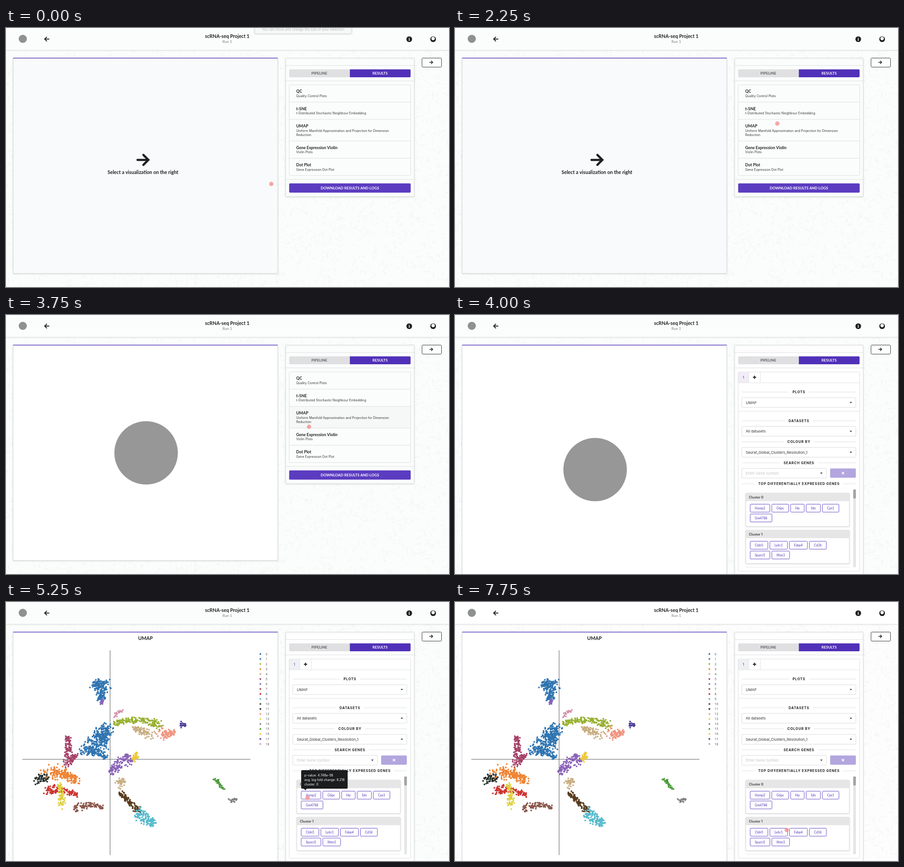
Write an HTML page with a canvas that moves like this. It is 977 px wide and 573 px high and loops after 8 s.

```html
<!DOCTYPE html>
<html lang="en">
<head>
<meta charset="utf-8">
<title>Visualization browser</title>
<style>
html, body { margin: 0; width: 100%; height: 100%; overflow: hidden; background: #fafdfb; }
canvas { display: block; width: 977px; height: 573px; }
</style>
</head>
<body>
<canvas id="stage" width="977" height="573"></canvas>
<script>
const ctx = document.getElementById('stage').getContext('2d');
const LOOP = 8000, STEP = 250;
const LATO = 'Lato, sans-serif', INTER = 'Inter, sans-serif';
const PURPLE = '#5030b8', INK = '#1f2021', RULE = '#dcdfde';
const TITLE = { font: LATO, weight: 700, align: 'center' };
const COLORS = ['#2f74b0', '#2f74b0', '#97b02f', '#ee8434', '#c9ae82', '#a54167', '#8a63b8',
  '#8a564b', '#cc3330', '#55b9cc', '#573a1c', '#24302a', '#f0937e', '#ddd040', '#808080',
  '#4a9b3a', '#efc83a', '#4f3f96', '#d38fac'];

// Key points of the pointer: time, x, y
const POINTER = [[0, 585, 345], [1250, 602, 213], [1750, 733, 197], [3000, 670, 238],
  [4000, 668, 249], [5250, 665, 433], [6000, 716, 435], [6750, 756, 435], [7500, 756, 435],
  [7750, 731.5, 504.5]];

const TIPS = [
  { gene: 'Hamp2', from: 5250, to: 5750, p: '4.748e-56', fold: 6.218 },
  { gene: 'G6pc', from: 6000, to: 6500, p: '2.153e-48', fold: 5.407 },
  { gene: 'Hp', from: 7000, to: 7750, p: '1.362e-41', fold: 5.126 }];

let seed = 1;
function random() {
  seed = (seed * 16807) % 2147483647;
  return seed / 2147483647;
}

function text(str, x, y, size, { font = INTER, weight = 400, color = INK, align = 'left', spacing = 0 } = {}) {
  ctx.font = `${weight} ${size}px ${font}`;
  ctx.letterSpacing = spacing + 'px';
  ctx.textAlign = align;
  ctx.fillStyle = color;
  ctx.fillText(str, x, y + size * 0.36);
  const width = ctx.measureText(str).width;
  ctx.letterSpacing = '0px';
  return width;
}

function box(x, y, w, h, { fill, stroke, radius = 2 } = {}) {
  ctx.beginPath();
  ctx.roundRect(x, y, w, h, radius);
  if (fill) { ctx.fillStyle = fill; ctx.fill(); }
  if (stroke) { ctx.strokeStyle = stroke; ctx.lineWidth = 1; ctx.stroke(); }
}

function path(points, color, width = 1) {
  ctx.beginPath();
  points.forEach(([x, y]) => ctx.lineTo(x, y));
  ctx.strokeStyle = color;
  ctx.lineWidth = width;
  ctx.stroke();
}

const rule = (x0, x1, y, color = RULE) => path([[x0, y], [x1, y]], color);

function disc(x, y, r, color) {
  ctx.beginPath();
  ctx.arc(x, y, r, 0, Math.PI * 2);
  ctx.fillStyle = color;
  ctx.fill();
}

function triangle(x, y, half, height, color) {
  ctx.beginPath();
  ctx.moveTo(x - half, y);
  ctx.lineTo(x + half, y);
  ctx.lineTo(x, y + height);
  ctx.fillStyle = color;
  ctx.fill();
}

// Arrow pointing right for dir = 1, left for dir = -1
function arrow(x, y, half, head, width, dir) {
  ctx.lineCap = 'round';
  path([[x - half * dir, y], [x + half * dir * 0.85, y]], INK, width);
  path([[x + (half - head) * dir, y - head], [x + half * dir, y], [x + (half - head) * dir, y + head]], INK, width);
  ctx.lineCap = 'butt';
}

function cross(x, y, size, color, width, turn) {
  for (let i = 0; i < 2; i++) {
    const a = turn + i * Math.PI / 2, dx = size * Math.cos(a), dy = size * Math.sin(a);
    path([[x - dx, y - dy], [x + dx, y + dy]], color, width);
  }
}

function shadowed(draw) {
  ctx.save();
  ctx.shadowColor = 'rgba(34,36,38,.13)';
  ctx.shadowBlur = 3;
  ctx.shadowOffsetY = 1;
  draw();
  ctx.restore();
}

function drawTexture() {
  seed = 77;
  ctx.beginPath();
  for (let i = 0; i < 3300; i++) {
    const x = random() * 977, y = 50 + random() * 523, a = random() * Math.PI, r = 3 + random() * 3;
    ctx.moveTo(x - r * Math.cos(a), y - r * Math.sin(a));
    ctx.lineTo(x + r * Math.cos(a), y + r * Math.sin(a));
  }
  ctx.strokeStyle = '#eff2f0';
  ctx.lineWidth = 0.9;
  ctx.stroke();
}

function drawPage(bright) {
  ctx.fillStyle = bright ? '#fdfdfd' : '#fafdfb';
  ctx.fillRect(0, 0, 977, 573);
  drawTexture();
  shadowed(() => {
    ctx.fillStyle = bright ? '#ffffff' : '#fbfdfc';
    ctx.fillRect(0, 0, 977, 49);
  });
  rule(0, 977, 49, '#e1e4e2');
  disc(37, 24, 9, '#8f9190');
  arrow(90, 24.5, 4.7, 4.4, 2, -1);
  text('scRNA-seq Project 1', 488, 18.5, 10.65, TITLE);
  text('Run 1', 488, 30, 8.15, { font: LATO, color: '#77797a', align: 'center' });

  disc(889.3, 24.7, 6.3, INK);
  text('i', 889.3, 24.7, 9.5, { font: '"Noto Serif", serif', weight: 700, color: '#fff', align: 'center' });

  disc(942, 24.7, 6.3, INK);
  disc(942, 23.2, 3.7, '#fff');

  box(917.5, 66.5, 43, 20, { fill: '#fff', stroke: '#343536' });
  arrow(937.7, 76, 3.3, 3, 1.5, 1);
}

function drawStagePanel(bottom, fill) {
  shadowed(() => box(15.5, 66.5, 584, bottom - 66.5, { fill, stroke: '#dadbe0' }));
  ctx.fillStyle = '#6143c4';
  ctx.fillRect(15.5, 65.8, 584, 1.5);
}

function drawSidePanel(bottom, fill) {
  shadowed(() => box(616.5, 66.5, 284, bottom - 66.5, { fill, stroke: RULE }));
  rule(616, 901, 83);
  rule(616, 901, 117);
  box(624.5, 91.5, 134, 17.5, { fill: '#e0e0e2', radius: [2, 0, 0, 2] });
  box(758.3, 91.5, 134, 17.5, { fill: PURPLE, radius: [0, 2, 2, 0] });
  text('PIPELINE', 691, 100.3, 8.2, { ...TITLE, color: '#5d5e60' });
  text('RESULTS', 825, 100.3, 8.2, { ...TITLE, color: '#fff' });
}

function drawList(hovered) {
  const items = [
    ['QC', 'Quality Control Plots'],
    ['t-SNE', 't-Distributed Stochastic Neighbour Embedding'],
    ['UMAP', 'Uniform Manifold Approximation and Projection for Dimension', 'Reduction'],
    ['Gene Expression Violin', 'Violin Plots'],
    ['Dot Plot', 'Gene Expression Dot Plot']];
  drawSidePanel(373, '#fbfdfc');
  let y = 125.8;
  for (const [title, ...lines] of items) {
    const height = 28.6 + lines.length * 9.6;
    if (title === hovered) box(625, y, 267, height, { fill: '#f6f7f7', radius: 0 });
    if (y > 126) rule(624.5, 892.5, y);
    text(title, 640, y + 14.3, 8.9, { font: LATO, weight: 700 });
    lines.forEach((line, i) => text(line, 640, y + 24.9 + i * 9.6, 7, { color: '#343638' }));
    y += height;
  }
  box(624.5, 125.8, 268, y - 125.8, { stroke: RULE });
  rule(616, 901, 335);
  box(624.5, 343.7, 268, 20.6, { fill: '#5b3cc0' });
  text('DOWNLOAD RESULTS AND LOGS', 758.3, 354.2, 8.2, { ...TITLE, color: '#fff' });
}

function heading(label, y) {
  const half = text(label, 758.6, y, 7.5, { weight: 700, align: 'center', spacing: 0.8 }) / 2 + 8;
  rule(632.5, 758.3 - half, y);
  rule(758.3 + half, 884, y);
}

function dropdown(label, y, right = 884, color = '#303234') {
  box(632.5, y - 10.8, right - 632.5, 21.6, { fill: '#fff', stroke: '#d9dadc' });
  text(label, 641.3, y, 8, { color });
  triangle(right - 11, y - 1.3, 2.6, 2.8, INK);
}

// Draws the chips and returns the left edge of each by gene
function drawChips(genes, top) {
  const lefts = {};
  let x = 651;
  for (const gene of genes) {
    ctx.font = `400 7.1px ${LATO}`;
    const w = ctx.measureText(gene).width + 20.6;
    box(x, top, w, 17.6, { fill: '#fff', stroke: '#6448c2' });
    text(gene, x + w / 2, top + 8.9, 7.1, { font: LATO, color: PURPLE, align: 'center' });
    lefts[gene] = x;
    x += w + 4.3;
  }
  return lefts;
}

function drawCard(title, y, ...rows) {
  shadowed(() => box(641, y, 229, 73.8, { fill: '#fff', stroke: '#dddee0' }));
  box(641, y, 229, 17.8, { fill: '#e6e6e7', radius: [2, 2, 0, 0] });
  text(title, 648.3, y + 9.2, 7.1, { weight: 700, color: '#48494b' });
  return Object.assign({}, ...rows.map((genes, i) => drawChips(genes, y + 24.5 + i * 21.7)));
}

function drawControls(tabFill) {
  drawSidePanel(600, '#fefefe');
  box(624.5, 126, 268, 441, { fill: '#fff', stroke: RULE });
  box(625, 126.5, 22.5, 23, { fill: tabFill, radius: 0 });
  [647.8, 673.3].forEach(x => path([[x, 126], [x, 150]], RULE));
  rule(624.5, 892.5, 150);
  text('1', 636, 138, 8, { color: PURPLE, align: 'center' });
  cross(660.6, 137.8, 3.6, INK, 2.1, 0);

  heading('PLOTS', 170.5);
  dropdown('UMAP', 193.8);
  rule(624.5, 892.5, 213);
  heading('DATASETS', 234);
  dropdown('All datasets', 257.2);
  heading('COLOUR BY', 280.5);
  dropdown('Seurat_Global_Clusters_Resolution_1', 303.8);
  heading('SEARCH GENES', 327);
  dropdown('Enter Gene Symbol', 350, 819, '#c3c4c6');
  box(827.3, 339.4, 56.7, 20.6, { fill: '#b3a6df' });
  cross(855.6, 349.7, 3.3, '#fff', 1.8, Math.PI / 4);
  heading('TOP DIFFERENTIALLY EXPRESSED GENES', 373.6);

  box(878.3, 386, 5.8, 172, { fill: '#e5e5e5', radius: 0 });
  box(878.3, 386, 5.8, 20, { fill: '#a3a3a3' });
  const lefts = drawCard('Cluster 0', 394, ['Hamp2', 'G6pc', 'Hp', 'Sds', 'Cps1'], ['Gm4788']);
  drawCard('Cluster 1', 476, ['Cldn5', 'Ly6c1', 'Fabp4', 'Cd36'], ['Sparcl1', 'Ifitm3']);
  rule(641, 870, 558, '#e6e7e8');
  return lefts;
}

// Scatters dots around a bent line, thinning toward its end; the count follows from the area
function band(cluster, spread, x0, y0, x1, y1, bend = 0) {
  const dx = x1 - x0, dy = y1 - y0;
  const count = 0.16 * (Math.hypot(dx, dy) + spread) * spread;
  for (let i = 0; i < count; i++) {
    const f = random(), bow = bend * 4 * f * (1 - f);
    const r = spread * (1 - f / 2) * (random() + random()) * 0.75, a = random() * Math.PI * 2;
    disc(x0 + dx * f - dy * bow + r * Math.cos(a), y0 + dy * f + dx * bow + r * Math.sin(a), 1.9, COLORS[cluster]);
  }
}

function drawPlot() {
  text('UMAP', 307.5, 80.3, 10.65, TITLE);
  path([[229.6, 107], [229.6, 560]], '#55565a');
  rule(36, 539, 348, '#55565a');

  seed = 4242;
  band(0, 14, 222, 183, 192, 186, 0.1);
  band(0, 12, 209, 184, 210, 218);
  band(6, 5, 210, 212, 210, 226);
  band(1, 24, 195, 317, 223, 282);
  band(1, 10, 165, 326, 222, 346, -0.1);
  band(18, 4, 240, 256, 257, 240, -0.15);
  band(2, 9, 340, 273, 238, 270, 0.1);
  band(4, 10, 320, 294, 282, 278);
  band(12, 11, 340, 290, 371, 285, 0.15);
  band(17, 9, 387, 271, 390, 270);
  band(5, 9, 134, 360, 138, 297);
  band(5, 8, 137, 354, 157, 335);
  band(6, 12, 262, 353, 232, 380, 0.1);
  band(6, 9, 275, 352, 262, 340);
  band(16, 10, 283, 350, 286, 338);
  band(11, 12, 70, 395, 88, 388);
  band(3, 15, 95, 376, 156, 396, -0.1);
  band(8, 9, 88, 417, 157, 428, -0.08);
  band(13, 8, 125, 455, 119, 403);
  band(7, 8, 150, 460, 214, 455, -0.13);
  band(4, 10, 246, 408, 260, 394, -0.1);
  band(10, 9, 291, 460, 252, 422);
  band(9, 13, 290, 467, 327, 492);
  band(15, 5, 460, 390, 480, 415);
  band(14, 6, 494, 440, 510, 436);

  COLORS.forEach((color, i) => {
    const y = 115 + i * 11.06;
    disc(561, y, 1.9, color);
    text(String(i), 572.5, y, 7, { font: '"Open Sans", sans-serif', color: '#45474c' });
  });
}

function drawTip(x, { p, fold }) {
  box(x, 372, 102.5, 41, { fill: '#1b1c1d', radius: 2.5 });
  triangle(x + 9.2, 412.5, 3.8, 4, '#1b1c1d');
  [`p-value: ${p}`, `avg. log fold change: ${fold}`, 'cluster: 0']
    .forEach((line, i) => text(line, x + 7, 383.2 + i * 10, 7, { color: '#fff' }));
}

function pointerAt(t) {
  const next = Math.max(1, POINTER.findIndex(([time]) => time >= t));
  const [t0, x0, y0] = POINTER[next - 1], [t1, x1, y1] = POINTER[next];
  const f = (t - t0) / (t1 - t0), ease = f * f * (3 - 2 * f);
  return [x0 + (x1 - x0) * ease, y0 + (y1 - y0) * ease];
}

function drawPointer(t) {
  const [x, y] = pointerAt(t);
  if (t === 4000) {
    ctx.beginPath();
    ctx.arc(x, y, 6.5, 0, Math.PI * 2);
    ctx.strokeStyle = '#f1eeee';
    ctx.lineWidth = 1;
    ctx.stroke();
  } else {
    disc(x, y, 4.7, 'rgba(241,132,132,.72)');
  }
}

function drawPrompt(t) {
  const x = 307.5 + 7.8 * Math.sin(Math.PI * 2 * t / 1000 - Math.PI / 4);
  arrow(x, 291.8, 12, 11, 4.8, 1);
  text('Select a visualization on the right', x, 318.7, 10.65, TITLE);
}

function drawNotice() {
  shadowed(() => box(548, -12, 214.5, 24.5, { fill: '#f7f8f8', stroke: '#dcdddd', radius: 3 }));
  text('You can move and change the size of your selection', 655, 3.2, 7.4, { color: '#b9babc', align: 'center' });
}

function drawChooser(t) {
  const loading = t >= 3750;
  drawStagePanel(543, loading ? '#fff' : '#f9fafb');
  if (loading) disc(309, 305, 70, '#979797');
  else drawPrompt(t);
  drawList(t >= 2750 ? 'UMAP' : '');
  if (t < 250) drawNotice();
}

function drawResult(t) {
  const loading = t < 4500;
  drawStagePanel(600, '#fff');
  if (loading) disc(309, 342, 70, '#979797');
  else drawPlot();
  const lefts = drawControls(loading ? '#f1ecf7' : '#eff0f3');
  const tip = TIPS.find(({ from, to }) => t >= from && t < to);
  if (tip) drawTip(lefts[tip.gene], tip);
}

function render(t) {
  drawPage(t >= 7000);
  if (t < 4000) drawChooser(t);
  else drawResult(t);
  drawPointer(t);
}

let shown = -1;
function tick(now) {
  const t = Math.floor((now % LOOP) / STEP) * STEP;
  if (t !== shown) {
    render(t);
    shown = t;
  }
  requestAnimationFrame(tick);
}
render(0);
requestAnimationFrame(tick);
</script>
</body>
</html>
```
